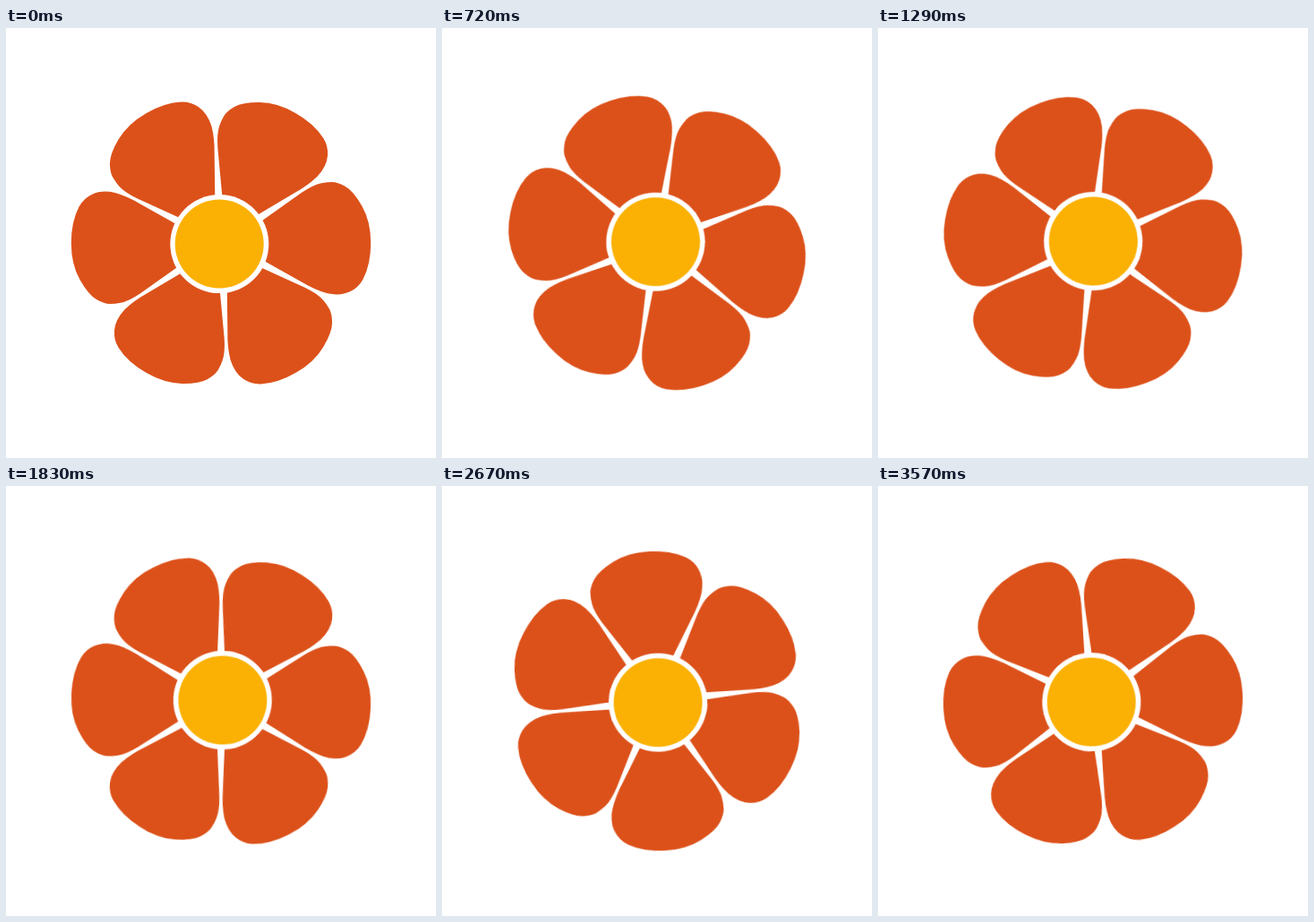
Animation of 480 by 480 pixels, one loop 3600 ms. Source, as an HTML page:

```html
<!DOCTYPE html>
<html lang="en">
<head>
<meta charset="utf-8">
<title>Spinning flower</title>
<style>
  html, body {
    margin: 0;
    width: 100%;
    height: 100%;
    overflow: hidden;
    background: #fff;
  }
  svg {
    display: block;
    width: 100vw;
    height: 100vh;
  }
  .flower {
    transform-origin: 0 0;
    animation: spin 3.6s steps(120, end) infinite;
  }
  .petals { fill: #dc511a; }
  .rim { fill: #fff; }
  .heart { fill: #fbb103; }
  @keyframes spin {
    to { transform: rotate(360deg); }
  }
</style>
</head>
<body>
<svg viewBox="-240 -240 480 480">
  <defs>
    <path id="petal" d="M20 4 L49 20.5 L90 43.5 Q104 52 118 56
      Q133 59.5 144 54.3 Q153.5 49.8 158.5 40.5 Q167.2 23.9 167.2 0
      Q167.2 -23.9 157.5 -41 Q148 -57.8 139 -63 Q130.2 -68 124 -68
      Q118 -68 112 -66.8 Q103 -65 90 -56.2 L46.7 -25.5 L20 -6.5 Z"/>
  </defs>
  <g class="flower">
    <g class="petals">
      <use href="#petal"/>
      <use href="#petal" transform="rotate(60)"/>
      <use href="#petal" transform="rotate(120)"/>
      <use href="#petal" transform="rotate(180)"/>
      <use href="#petal" transform="rotate(240)"/>
      <use href="#petal" transform="rotate(300)"/>
    </g>
    <!-- the heart sits slightly off the axis, so it wobbles -->
    <circle class="rim" cx="-1.7" cy="1.1" r="55"/>
    <circle class="heart" cx="-1.8" cy="1.1" r="49.5"/>
  </g>
</svg>
</body>
</html>
```
